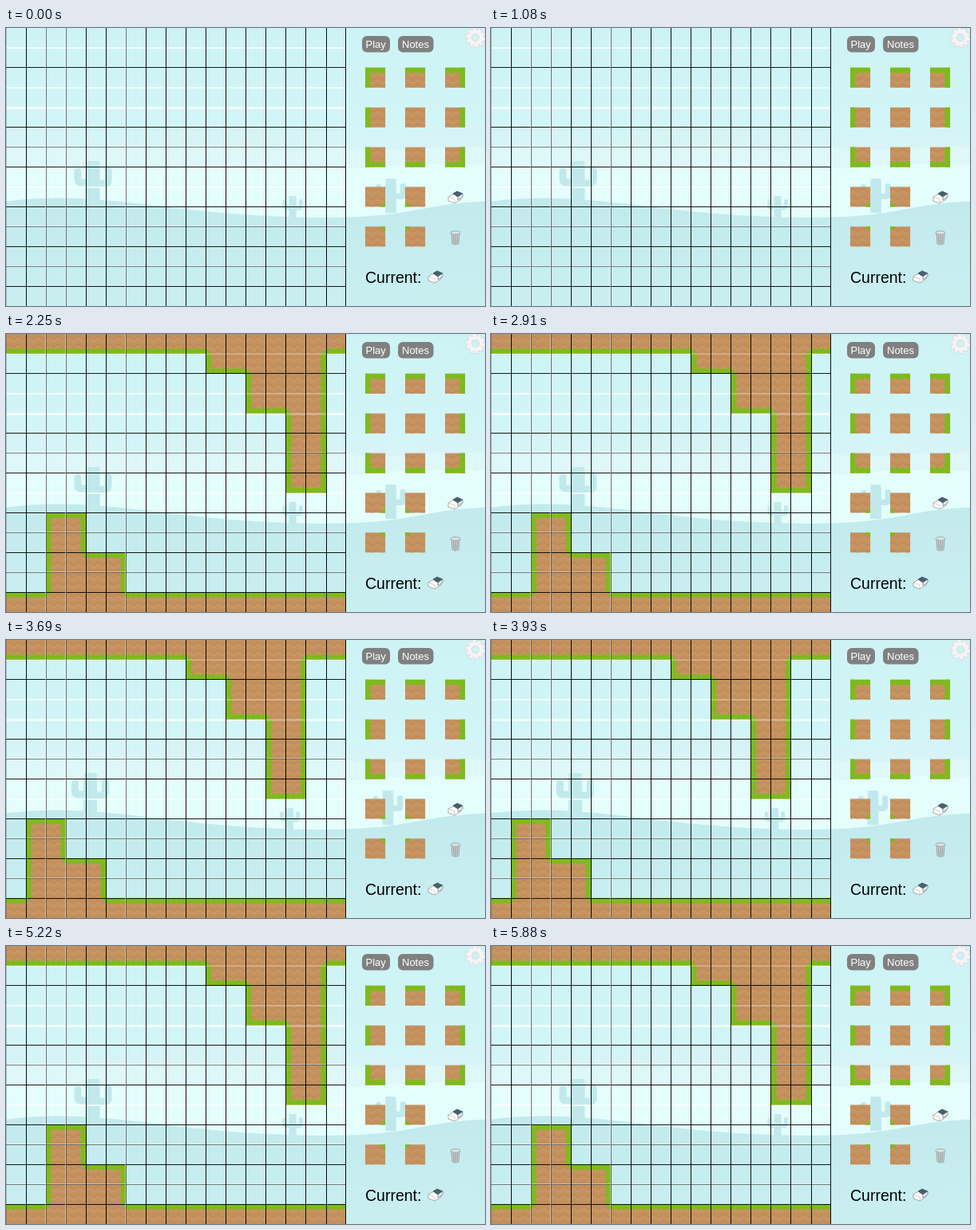
Write an HTML page that moves like this. It is 600 px wide and 349 px high and loops after 5.91 s.

```html
<!DOCTYPE html>
<html lang="en">
<head>
<meta charset="utf-8">
<title>Level editor</title>
<style>
  html, body { margin: 0; width: 100%; height: 100%; overflow: hidden; background: #cff3f5; }
  svg { display: block; width: 600px; height: 349px; font-family: "Liberation Sans", Arial, sans-serif; }
</style>
</head>
<body>
<svg viewBox="0 0 600 349" xmlns="http://www.w3.org/2000/svg">
  <defs>
    <linearGradient id="sky" x2="0" y2="1">
      <stop offset="0" stop-color="#cdf3f5"/>
      <stop offset=".3" stop-color="#d1f5f7"/>
      <stop offset=".45" stop-color="#d5f6f8"/>
    </linearGradient>
    <linearGradient id="far" x2="0" y2="1">
      <stop offset="0" stop-color="#d5f3f6"/>
      <stop offset="1" stop-color="#daf6f8"/>
    </linearGradient>
    <linearGradient id="ground" x2="0" y2="1">
      <stop offset="0" stop-color="#c2eaec"/>
      <stop offset="1" stop-color="#c9eff1"/>
    </linearGradient>
    <clipPath id="board"><rect width="426" height="349"/></clipPath>
    <g id="cactus" fill="none" stroke="#c1e9eb" stroke-linecap="round" stroke-linejoin="round">
      <path d="M0 5V54" stroke-width="17" stroke-linecap="butt"/>
      <path d="M-6 2.5H6" stroke-width="5"/>
      <path d="M-19 13V24Q-19 27 -15 27H0M19 12V25Q19 28 15 28H0" stroke-width="9"/>
    </g>
    <g id="eraser" stroke-linejoin="round" stroke-width=".7">
      <path d="M-9 0L-2 -4L7 -1V3L-1 8L-9 5Z" fill="#fff" stroke="#8a8a8a"/>
      <path d="M-9 0L-1 3V8" fill="none" stroke="#c9b3ae"/>
      <path d="M-3 -4L2 -7L9 -4L3 0Z" fill="#46616f" stroke="#34434c"/>
      <path d="M3 0L9 -4V0L3 4Z" fill="#e9eef0" stroke="#66747b"/>
    </g>
    <g id="bin">
      <path d="M-5 -5H5L4 8Q0 10 -4 8Z" fill="#cdd2d4" stroke="#8f9799" stroke-width=".8"/>
      <path d="M-2.5 -3L-2 7M0 -3V8M2.5 -3L2 7" stroke="#8c9497" stroke-width=".9"/>
      <ellipse cy="-6" rx="6" ry="2.2" fill="#dfe3e4" stroke="#8f9799" stroke-width=".8"/>
    </g>
  </defs>
  <g id="backdrop">
    <rect x="-10" width="640" height="349" fill="url(#sky)"/>
    <path d="M-10 131Q12 123 35 122T84 125Q100 130 118 141Q137 133 158 135T205 130Q235 119 262 122T322 125Q344 133 360 130T407 126Q425 134 444 134T505 139Q526 128 554 124T630 129V190H-10Z" fill="url(#far)"/>
    <path d="M-10 151Q24 146 62 149T121 153Q143 145 170 150T238 150Q270 145 308 150T373 154Q399 148 426 151T501 153Q551 146 630 151V190H-10Z" fill="#def8fa"/>
    <path d="M-10 175Q45 168 102 174T224 174T353 174T470 174T630 173V260H-10Z" fill="#e4fdfd"/>
    <use href="#cactus" x="109" y="167"/>
    <use href="#cactus" transform="translate(359 211) scale(.54)"/>
    <use href="#cactus" transform="translate(482 189) scale(.8)"/>
    <path d="M-10 219Q40 212 90 214C170 218 225 230 310 235S455 239 505 230S570 218 630 217V349H-10Z" fill="url(#ground)"/>
  </g>
  <g clip-path="url(#board)">
    <g id="glow"></g>
    <g id="level"></g>
    <g id="grid"></g>
  </g>
  <g id="palette"></g>
  <g fill="#808080">
    <rect x="446" y="10" width="35" height="20.5" rx="6"/>
    <rect x="491" y="10" width="44.5" height="20.5" rx="6"/>
  </g>
  <g fill="#fff" font-size="13">
    <text x="450.5" y="25">Play</text>
    <text x="496" y="25">Notes</text>
  </g>
  <g transform="translate(588 12)">
    <circle r="10.8" fill="none" stroke="#d5d3d8" stroke-width="4.4" stroke-dasharray="4.2 2.586"/>
    <circle r="7.4" fill="none" stroke="#d5d3d8" stroke-width="6.4"/>
    <circle r="10.5" fill="none" stroke="#f5f3f6" stroke-width="3.4" stroke-dasharray="3.8 2.797"/>
    <circle r="7.4" fill="none" stroke="#f5f3f6" stroke-width="5"/>
  </g>
  <use href="#eraser" x="563" y="212"/>
  <use href="#bin" x="563" y="263"/>
  <use href="#eraser" x="538" y="312"/>
  <text x="450" y="320" font-size="19.5">Current:</text>
</svg>
<script>
const LOOP = 5910;
const LEVEL_SHOWN = 2040, SCROLL_START = 3645, SCROLL_END = 3960;
const COLS = 17, ROWS = 14, TILE_W = 25.0625, TILE_H = 349 / ROWS;
const byId = id => document.getElementById(id);

// Grass strip along the top edge of a 25 px tile; the other sides are rotations.
const teeth = Array.from({ length: 4 }, (_, i) => `L${21.9 - i * 6.25} 8L${18.75 - i * 6.25} 5`).join("");
const grassStrip = `M0 0H25V5${teeth}Z`;
const SIDES = { t: 0, r: 90, b: 180, l: 270 };
const CORNERS = { tl: 0, tr: 90, br: 180, bl: 270 };

const wave = y => `M0 ${y}` + [0, 1, 2, 3].map(i => `q3.1 ${i % 2 ? 3 : -3} 6.25 0`).join("");
const dirt = `<rect width="25.1" height="25" fill="#c5925f"/>
  <path d="${[4, 14, 23].map(wave).join("")}" fill="none" stroke="#b88452" stroke-width="1.7" opacity=".4"/>
  <path d="${[8, 18].map(wave).join("")}" fill="none" stroke="#d0a06d" stroke-width="1.6" opacity=".4"/>`;

const turned = (path, angle) =>
  `<path d="${path}" fill="#7dbb1d" transform="rotate(${angle} 12.5 12.5)"/>`;

function tile(x, y, sides, corners = []) {
  const grass = sides.map(s => turned(grassStrip, SIDES[s])).join("") +
    corners.map(c => turned("M0 0H6.5L0 6.5Z", CORNERS[c])).join("");
  return `<g transform="translate(${x} ${y})">${dirt}${grass}</g>`;
}

function solid(col, row) {
  if (row <= 0 || row >= ROWS - 1) return true;
  if (row <= 7) {
    const left = row === 1 ? 10 : row <= 3 ? 12 : 14;
    return col >= left && col < 16;
  }
  return row >= 9 && col >= 2 && col < (row < 11 ? 4 : 6);
}

function buildLevel() {
  let out = "";
  for (let row = 0; row < ROWS; row++) {
    for (let col = -1; col <= COLS + 1; col++) {
      if (!solid(col, row)) continue;
      const open = { t: !solid(col, row - 1), r: !solid(col + 1, row), b: !solid(col, row + 1), l: !solid(col - 1, row) };
      const sides = Object.keys(open).filter(s => open[s]);
      const corners = Object.keys(CORNERS).filter(c => !open[c[0]] && !open[c[1]] &&
        !solid(col + (c[1] === "l" ? -1 : 1), row + (c[0] === "t" ? -1 : 1)));
      out += tile(col * TILE_W, row * TILE_H, sides, corners);
    }
  }
  return out;
}

const WHITE_ROWS = [1, 3, 4, 8], GRAY_ROWS = [6, 10, 12], GRAY_COLS = [0, 2, 3, 6];
const lineY = row => Math.floor(row * TILE_H);
const bar = (x, y, w, h, color, opacity) =>
  `<rect x="${x}" y="${y}" width="${w}" height="${h}" fill="${color}" opacity="${opacity}"/>`;
const whiteRows = opacity =>
  WHITE_ROWS.map(row => bar(0, lineY(row), 426, row === 4 ? 3 : 2, "#fff", opacity)).join("");

function buildGrid() {
  let out = whiteRows(.25);
  for (let row = 1; row < ROWS; row++) {
    if (WHITE_ROWS.includes(row)) continue;
    const y = lineY(row), gray = GRAY_ROWS.includes(row);
    if (gray) out += bar(0, y - 1, 426, 1, "#fff", .4);
    out += bar(0, y, 426, 1, gray ? "#555" : "#000", gray ? .75 : .9);
  }
  for (let col = 0; col <= COLS; col++) {
    const x = Math.min(425, Math.floor(col * TILE_W));
    const gray = GRAY_COLS.includes(col);
    if (gray) out += bar(x - 1, 0, 1, 349, "#fff", .4);
    out += bar(x, 0, 1, 349, gray ? "#444" : "#000", col ? (gray ? .75 : .95) : .3);
  }
  return out;
}

function buildPalette() {
  const kinds = ["lt", "t", "rt", "l", "", "r", "lb", "b", "rb"].map(e => [[...e], []]);
  const inner = ["br", "bl", "tr", "tl"].map(c => [[], [c]]);
  const place = (list, perRow, top) => list.map(([sides, corners], i) =>
    tile(450 + i % perRow * 50, (top + Math.floor(i / perRow)) * 2 * TILE_H, sides, corners)).join("");
  return place(kinds, 3, 1) + place(inner, 2, 4);
}

byId("glow").innerHTML = whiteRows(.6);
byId("level").innerHTML = buildLevel();
byId("grid").innerHTML = buildGrid();
byId("palette").innerHTML = buildPalette();

function render(time) {
  const steps = time >= SCROLL_START && time < SCROLL_END ? 1 : 0;
  byId("level").setAttribute("visibility", time >= LEVEL_SHOWN ? "visible" : "hidden");
  byId("level").setAttribute("transform", `translate(${-steps * TILE_W} 0)`);
  byId("backdrop").setAttribute("transform", `translate(${-steps * 3.5} 0)`);
}

const start = performance.now();
function tick() {
  render((performance.now() - start) % LOOP);
  requestAnimationFrame(tick);
}
tick();
</script>
</body>
</html>
```
